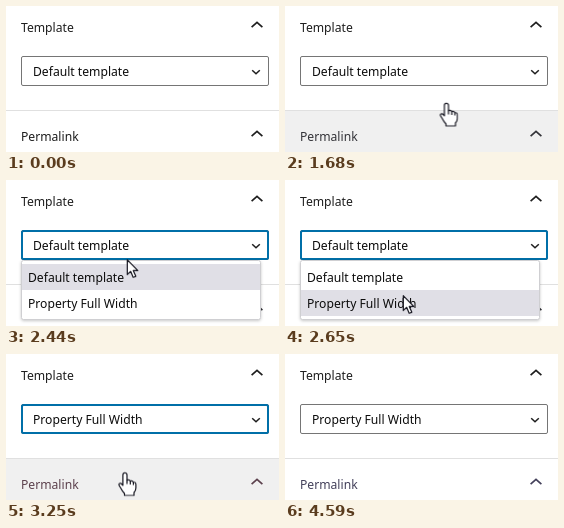
Recreate the animation shown at these times as an HTML page. Size 273 px wide and 146 px high, loop 4620 ms.

```html
<!DOCTYPE html>
<html lang="en">
<head>
<meta charset="utf-8">
<title>Template selector</title>
<style>
  html, body { margin: 0; width: 100%; height: 100%; overflow: hidden; background: #fff; }
  svg { display: block; width: 100vw; height: 100vh; }
  text { font: 12.15px "Noto Sans", "Open Sans", sans-serif; fill: #1e1e1e; }
  .value, .option { fill: #0c0c0c; }
  .chevron { fill: none; stroke: currentColor; stroke-width: 1.7; }
  .cursor { fill: #fff; stroke: #161620; stroke-width: 1.2; stroke-linejoin: round; }
  #permalink { color: #1e1e1e; }
  #permalink text { fill: currentColor; }
  #list { filter: drop-shadow(0 1px 1.5px rgba(0, 0, 0, .22)); }
</style>
</head>
<body>
<svg viewBox="0 0 273 146">
  <text x="15" y="25.5">Template</text>
  <path class="chevron" color="#1e1e1e" d="M245.6 21.2 251 16.4 256.4 21.2"/>

  <rect id="hover" y="105" width="273" height="41" fill="#f0f0f0" opacity="0"/>
  <path d="M0 104.5H273" stroke="#e0e0e0"/>
  <g id="permalink">
    <text x="15" y="134.5">Permalink</text>
    <path class="chevron" d="M245.6 130.2 251 125.4 256.4 130.2"/>
  </g>

  <rect x="15.5" y="50.5" width="247" height="29" rx="1.5" fill="#fff" stroke="#757575"/>
  <rect id="focus" x="16" y="51" width="246" height="28" rx="1.5" fill="none" stroke="#006fa8" stroke-width="2" opacity="0"/>
  <text id="before" class="value" x="27" y="70">Default template</text>
  <text id="after" class="value" x="27" y="70" opacity="0">Property Full Width</text>
  <path class="chevron" color="#1e1e1e" d="M246.2 64.2 250 67.8 253.8 64.2" style="stroke-width:1.5"/>

  <g id="list" opacity="0">
    <rect x="15.5" y="80.5" width="239" height="59" rx="2" fill="#fff" stroke="#cfcfd2"/>
    <rect id="mark" x="16" y="84" width="238" height="26" fill="#e0dfe6"/>
    <text class="option" x="22" y="101.5">Default template</text>
    <text class="option" x="22" y="127.5">Property Full Width</text>
  </g>

  <g id="pointer" opacity="0">
    <g id="hand" class="cursor">
      <path d="M-2.1 2.4A2 2 0 0 1 2 2.4V7.6Q4.5 6.8 5.3 8.6 7.6 8 8.4 9.8 10.9 9.4 10.9 12V15.5Q10.9 18 9 20V23H-.5V21Q-2.5 19-4 16L-6 12.8Q-6.3 10.6-4.3 10.8L-2.1 12.8Z"/>
      <path d="M2 7.6V11.5M5.3 8.6V12M8.4 9.8V12.5" fill="none"/>
    </g>
    <path id="arrow" class="cursor" opacity="0" d="M.3.6V15.4L3.7 12.3 6.2 18.2 8.8 17.1 6.3 11.4H10.8Z"/>
  </g>
</svg>
<script>
const LOOP = 4620;
const byId = id => document.getElementById(id);

// Each step is [ms, value, easing]; values jump unless an easing is given.
function play(id, property, steps) {
  const frames = steps.map(([ms, value, easing = "step-end"]) =>
    ({ offset: ms / LOOP, [property]: value, easing }));
  frames.push({ offset: 1, [property]: steps.at(-1)[1] });
  byId(id).animate(frames, { duration: LOOP, iterations: Infinity });
}

const at = (x, y) => `translate(${x}px, ${y}px)`;

play("pointer", "opacity", [[0, 0], [1460, 1], [3750, 0]]);
play("pointer", "transform", [
  [0, at(215.5, 142)],
  [1460, at(215.5, 142), "cubic-bezier(.3, .1, .5, 1)"],
  [1950, at(122, 64)],
  [2400, at(122, 64), "linear"],
  [2440, at(121, 79), "linear"],
  [2650, at(118, 115), "ease-out"],
  [2690, at(118, 117.5)],
  [2930, at(119, 118.5)],
  [3400, at(119, 118.5), "ease-in"],
  [3750, at(138, 149)]
]);
play("hand", "opacity", [[0, 1], [2400, 0], [2930, 1]]);
play("arrow", "opacity", [[0, 0], [2400, 1], [2930, 0]]);

play("focus", "opacity", [[0, 0], [2160, 1], [4590, 0]]);
play("list", "opacity", [[0, 0], [2160, 0], [2190, .5], [2230, 1], [2900, 0]]);
play("mark", "transform", [[0, at(0, 0)], [2610, at(0, 26)]]);
play("before", "opacity", [[0, 1], [2900, 0]]);
play("after", "opacity", [[0, 0], [2900, 1]]);

play("hover", "opacity", [
  [0, 0], [1480, 0, "ease"], [1580, 1],
  [1690, 1, "ease"], [1790, 0],
  [2930, 0, "ease"], [3030, 1],
  [3700, 1, "ease"], [3750, 0]
]);
play("permalink", "color", [
  [0, "#1e1e1e"], [1580, "#333338"],
  [2930, "#333338", "ease"], [3030, "#5c414d"], [3750, "#43405a"]
]);
</script>
</body>
</html>
```
